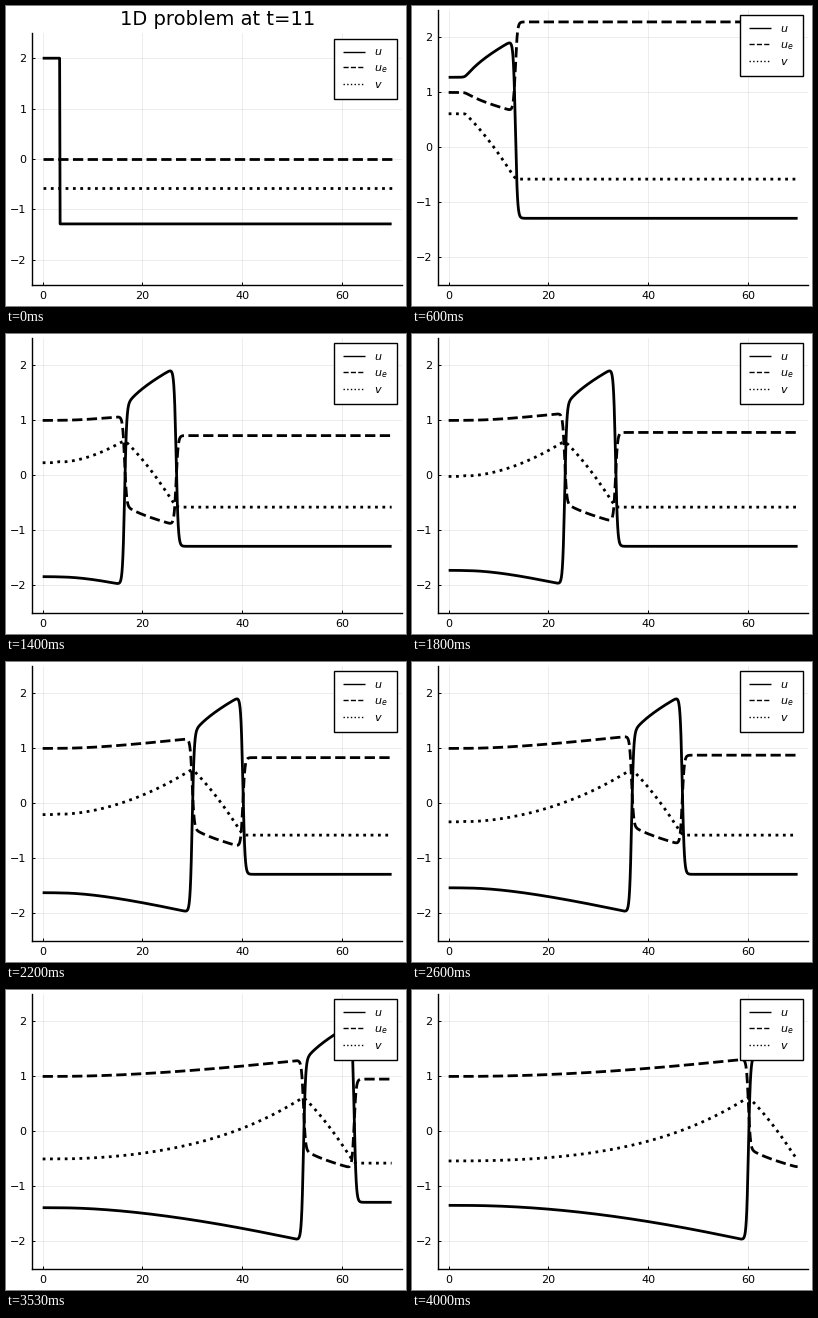
A matplotlib script for the animation above (4.07 s loop, 400 by 300 pixels).

```python
import numpy as np
import matplotlib.pyplot as plt
from matplotlib.animation import FuncAnimation

W, H, DPI = 400, 300, 100
STEPS, RATE = 61, 15            # pictures in the run, pictures per second
LOOP_MS, TICK_MS = 4070, 22     # the clock runs finer than the pictures

# Excitable medium: u_t = (u - u^3/3 - v)/EPS + D u_xx,  v_t = EPS (u + BETA - GAMMA v)
EPS, BETA, GAMMA = 0.1, 1.0, 0.5
LENGTH, N = 70, 701
STEP, SUBSTEPS = 0.5, 200
U_REST = -1.28791
V_REST = (U_REST + BETA) / GAMMA

x = np.linspace(0, LENGTH, N)
dx = x[1] - x[0]


def simulate(diffusion):
    """Return u and v at every step, starting from a stimulus at the left end."""
    u = np.where(x < 3.45, 2.0, U_REST)
    v = np.full(N, V_REST)
    flux = np.zeros(N + 1)
    dt = STEP / SUBSTEPS
    rate = diffusion * dt / dx**2
    us, vs = [u.copy()], [v.copy()]
    for _ in range(STEPS - 1):
        for _ in range(SUBSTEPS):
            flux[1:-1] = u[1:] - u[:-1]
            du = dt / EPS * (u - u * u * u / 3 - v) + rate * (flux[1:] - flux[:-1])
            v = v + dt * EPS * (u + BETA - GAMMA * v)
            u = u + du
        us.append(u.copy())
        vs.append(v.copy())
    return np.array(us), np.array(vs)


def front(u):
    """Position of the leading edge, where u last falls through zero."""
    i = np.nonzero(u > 0)[0][-1]
    if i == N - 1:
        return x[-1]
    return x[i] + dx * u[i] / (u[i] - u[i + 1])


# Tune the diffusion so that the wave gets to REACH at step PROBE
START, REACH, PROBE = 3.4, 55.87, 47
diffusion = 0.75
for _ in range(2):
    U, V = simulate(diffusion)
    diffusion *= ((REACH - START) / (front(U[PROBE]) - START)) ** 2
U, V = simulate(diffusion)

# Extracellular potential, fixed to 1 at the left end once the run has begun
UE = 1 + 0.5 * (U[:, :1] - U)
UE[0] = 0

plt.rcParams["font.family"] = "DejaVu Sans"
fig = plt.figure(figsize=(W / DPI, H / DPI), dpi=DPI, facecolor="white")


def box(top):
    left, right, bottom = 26.2, 396.1, 279.0
    return [left / W, 1 - bottom / H, (right - left) / W, (bottom - top) / H]


TOP, TOP_TITLED = 3.9, 27
ax = fig.add_axes(box(TOP))
ax.set_xlim(-2.1, 72.1)
ax.set_ylim(-2.5, 2.5)
ax.set_xticks(range(0, 61, 20))
ax.set_yticks(range(-2, 3))
ax.tick_params(direction="in", length=2, width=0.7, labelsize=8, pad=4.2)
ax.grid(color="black", alpha=0.1, linewidth=0.5)
ax.set_axisbelow(True)
for side in ("top", "right"):
    ax.spines[side].set_visible(False)
for side in ("left", "bottom"):
    ax.spines[side].set_linewidth(1)


def curve(style, label):
    return ax.plot(x, U[0], style, color="black", lw=2, label=label,
                   solid_capstyle="butt", dash_capstyle="butt")[0]


lines = [curve("-", "$u$"), curve("--", "$u_e$"), curve(":", "$v$")]
legend = ax.legend(loc="upper right", fontsize=8, borderpad=0.8, fancybox=False,
                   framealpha=1, facecolor="white", edgecolor="black")
legend.get_frame().set_linewidth(1)
for handle in legend.get_lines():
    handle.set_linewidth(1)
title = ax.set_title("", fontsize=14)


def step_at(ms):
    """Step on show; starts fall on whole 10 ms and are met by the tick before."""
    lead = TICK_MS - 1 + 10 / 3 + 0.01
    return min(int((ms + lead) * RATE / 1000), STEPS - 1)


def update(tick):
    k = step_at(tick * TICK_MS)
    first = k == 0
    ax.set_position(box(TOP_TITLED if first else TOP))
    title.set_text("1D problem at t=11" if first else "")
    for line, data in zip(lines, (U, UE, V)):
        line.set_ydata(data[k])
    return lines


anim = FuncAnimation(fig, update, frames=LOOP_MS // TICK_MS, interval=TICK_MS,
                     repeat=True, repeat_delay=0, blit=False)
plt.show()
```
